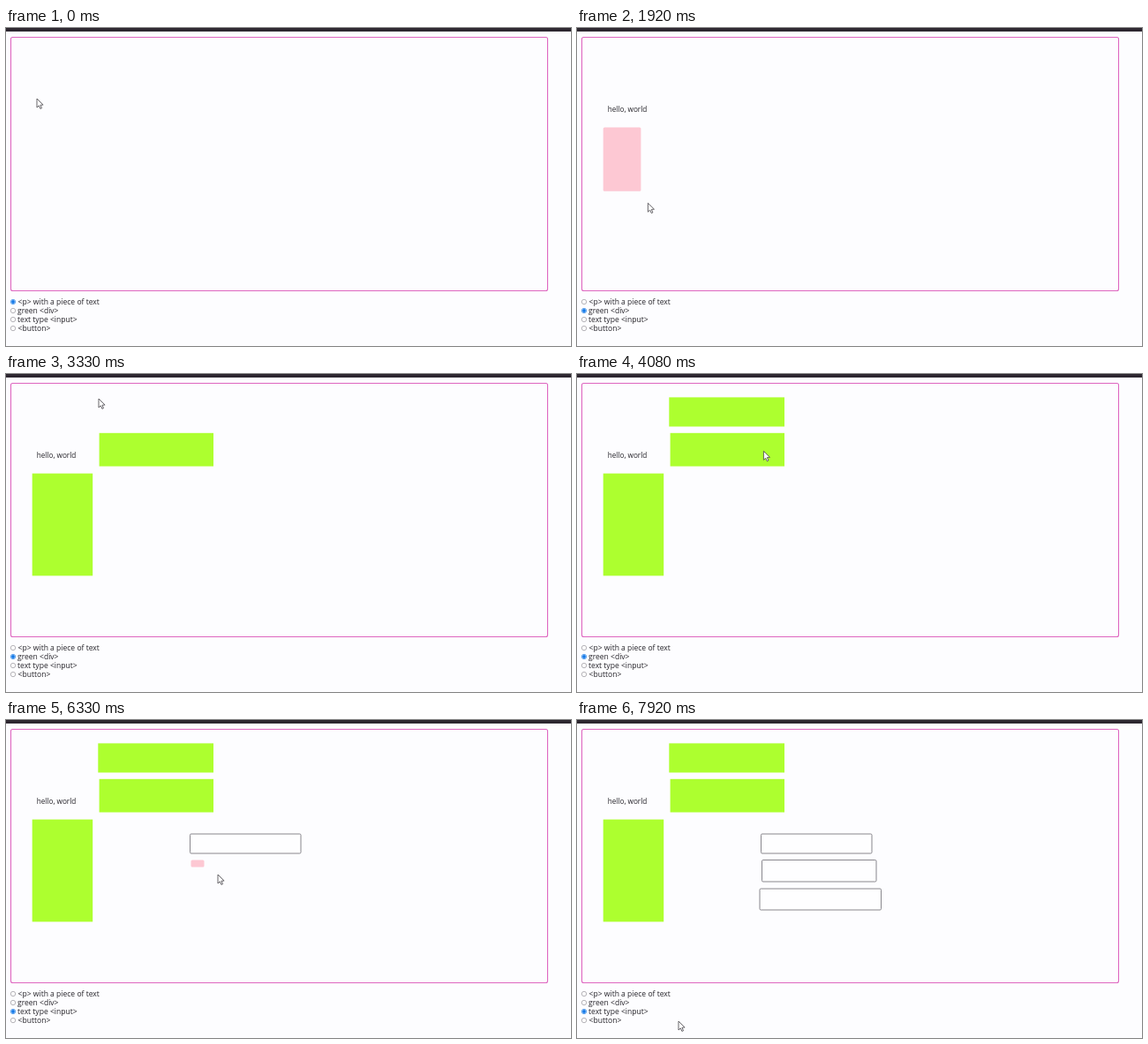
Animation, 640 px wide and 360 px high, one loop 8000 ms. Source, as an HTML page with a canvas:

```html
<!DOCTYPE html>
<html lang="en">
<head>
<meta charset="utf-8">
<title>Drag to create elements</title>
<style>
  html, body { margin: 0; width: 100%; height: 100%; overflow: hidden; background: #fdfdff; }
  canvas { display: block; width: 640px; height: 360px; }
</style>
</head>
<body>
<canvas id="stage" width="640" height="360"></canvas>
<script>
const ctx = document.getElementById('stage').getContext('2d');
const LOOP = 8000, TICK = 1000 / 12, LAG = 0.5;
const INK = '#26242a', PAPER = '#fdfdff';
const FONT = '"Open Sans", "Noto Sans", sans-serif';
const LABELS = ['<p> with a piece of text', 'green <div>', 'text type <input>', '<button>'];

// Pointer stops: tick, x, y; "ease" softens the way to that stop
const PATH = [
  [0, 35, 80], [4, 35, 80], [8, 92, 104], [9, 92, 104],
  [14, 8, 321, 'ease'], [16, 8, 321], [19, 30, 113, 'ease'],
  [25, 98, 228, 'ease'], [29, 106, 71, 'ease'], [30, 106, 67],
  [35, 235, 104, 'ease'], [36, 235, 104], [40, 105, 28, 'ease'], [41, 104, 27],
  [47, 235, 59, 'ease'], [48, 235, 59], [53, 8, 331, 'ease'],
  [57, 209, 129, 'ease'], [60.5, 286, 143], [61, 291, 143], [64, 334, 151],
  [66, 334, 151], [71, 209, 158, 'ease'], [75, 209, 158], [76, 240, 175],
  [81, 339, 183], [82, 339, 183], [86, 207, 191, 'ease'], [87, 207, 191],
  [91, 345, 215, 'ease'], [92, 352, 217], [94, 300, 250], [95, 115, 341]
];

// Each drag: first tick, tick of release, corners, result
const DRAGS = [
  { from: 4, to: 9, box: [35, 80, 92, 104], draw: hello },
  { from: 19, to: 26, box: [29.7, 112.6, 98.2, 228.4], draw: green },
  { from: 30, to: 36, box: [105.6, 66.8, 235, 104.5], draw: green },
  { from: 41, to: 48, box: [104.3, 26.4, 235, 59.5], draw: green },
  { from: 57, to: 65, box: [208.5, 129, 334, 151], draw: field },
  { from: 75, to: 82, box: [209.5, 158.5, 339, 183], draw: field },
  { from: 87, to: 94, box: [207, 191, 344.5, 215], draw: field }
];

function pointerAt(k) {
  const i = PATH.findIndex(p => p[0] > k);
  if (i < 0) return PATH[PATH.length - 1].slice(1, 3);
  const a = PATH[Math.max(i - 1, 0)], b = PATH[i];
  let u = Math.max(0, (k - a[0]) / (b[0] - a[0]));
  if (b[3]) u = u * u * (3 - 2 * u);
  return [a[1] + (b[1] - a[1]) * u, a[2] + (b[2] - a[2]) * u];
}

function roundBox(x, y, w, h, r) {
  ctx.beginPath();
  ctx.roundRect(x, y, w, h, r);
}

function text(str, x, y, size) {
  ctx.font = `${size}px ${FONT}`;
  ctx.fillStyle = INK;
  ctx.fillText(str, x, y);
}

function hello() {
  text('hello, world', 34.7, 95.2, 8.2);
}

function green([x, y, r, b]) {
  ctx.fillStyle = '#adff2f';
  ctx.fillRect(x, y, r - x, b - y);
}

function field([x, y, r, b]) {
  roundBox(x, y, r - x, b - y, 1.3);
  ctx.fillStyle = '#fefeff';
  ctx.fill();
  ctx.lineWidth = 0.9;
  ctx.strokeStyle = '#7c7a80';
  ctx.stroke();
}

function helper([x, y, r, b], [px, py]) {
  const w = Math.min(px, r) - x, h = Math.min(py, b) - y;
  if (w < 1 || h < 1) return;
  roundBox(x, y, w, h, 1.5);
  ctx.fillStyle = '#fdc8d3';
  ctx.fill();
}

function radio(i, on) {
  const y = 310 + i * 10;
  ctx.beginPath();
  ctx.arc(8, y, 2.7, 0, 7);
  ctx.fillStyle = '#fff';
  ctx.fill();
  ctx.lineWidth = 0.7;
  ctx.strokeStyle = on ? '#1d7fe8' : '#98969c';
  ctx.stroke();
  if (on) {
    ctx.beginPath();
    ctx.arc(8, y, 1.9, 0, 7);
    ctx.fillStyle = '#0f76e8';
    ctx.fill();
  }
  text(LABELS[i], i === 1 || i === 2 ? 13 : 13.6, y + 3, 8.55);
}

function arrow([x, y]) {
  ctx.save();
  ctx.translate(x, y);
  ctx.beginPath();
  [[0, 0], [0, 10], [2.3, 7.9], [3.9, 11.4], [5.5, 10.7], [4, 7.2], [7.1, 7]]
    .forEach(p => ctx.lineTo(...p));
  ctx.closePath();
  ctx.fillStyle = '#fff';
  ctx.fill();
  ctx.lineWidth = 0.85;
  ctx.strokeStyle = '#4c4a50';
  ctx.stroke();
  ctx.restore();
}

// Twelve ticks a second, one in six repeated, with a pause at the start
function tickAt(ms) {
  const k = Math.floor((ms + 4) / TICK);
  if (k < 5) return Math.min(k, 1);
  return k % 6 === 3 ? k - 1 : k;
}

function render(ms) {
  const k = tickAt(ms);
  ctx.fillStyle = PAPER;
  ctx.fillRect(0, 0, 640, 360);
  ctx.fillStyle = '#2d2730';
  ctx.fillRect(0, 0, 640, 4);

  roundBox(5.5, 10.5, 608, 287, 2);
  ctx.lineWidth = 1.1;
  ctx.strokeStyle = '#de66c0';
  ctx.stroke();

  for (const d of DRAGS) {
    if (k >= d.to) d.draw(d.box);
    else if (k >= d.from) helper(d.box, pointerAt(Math.max(d.from, k - LAG)));
  }
  const chosen = k < 16 ? 0 : k < 53 ? 1 : 2;
  LABELS.forEach((_, i) => radio(i, i === chosen));
  arrow(pointerAt(k));
}

function loop() {
  render(performance.now() % LOOP);
  requestAnimationFrame(loop);
}
loop();
</script>
</body>
</html>
```
